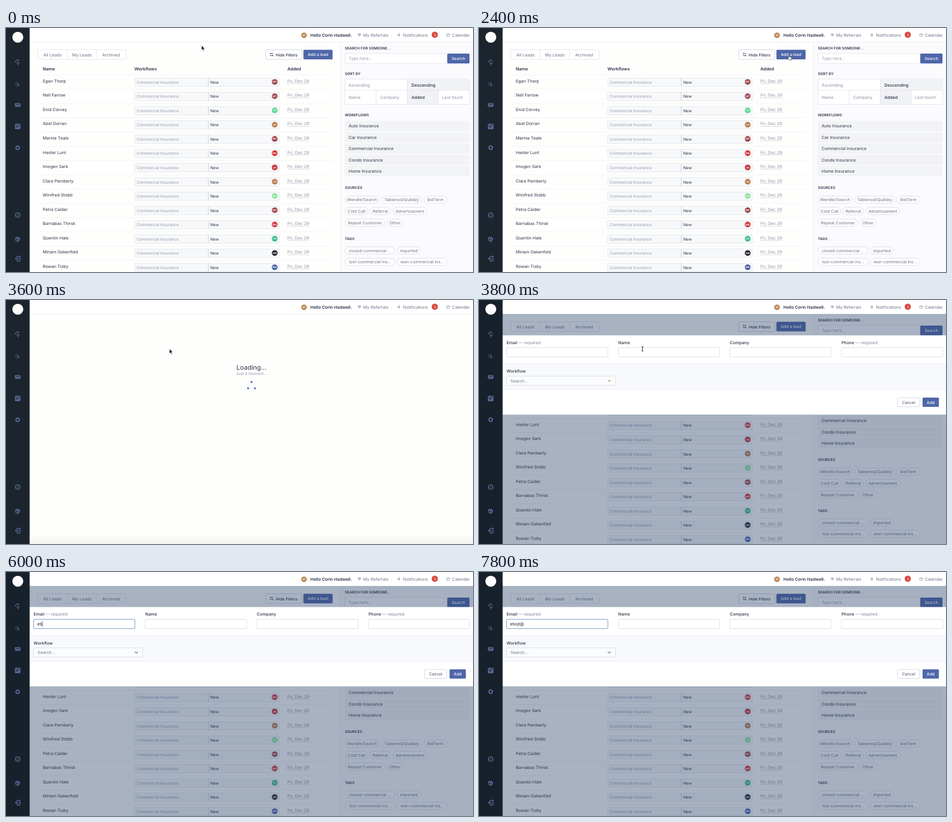
Recreate the animation shown at these times as an HTML page. Size 800 px wide and 420 px high, loop 8000 ms.

```html
<!DOCTYPE html>
<html lang="en">
<head>
<meta charset="utf-8">
<title>Leads</title>
<style>
html, body { margin: 0; height: 100%; overflow: hidden; background: #fff; }
svg { display: block; width: 800px; height: 420px; font-family: Inter, "Liberation Sans", sans-serif; text-rendering: geometricPrecision; }
</style>
</head>
<body>
<svg id="stage" viewBox="0 0 800 420"></svg>
<script>
const NS = 'http://www.w3.org/2000/svg';
const stage = document.getElementById('stage');
const INK = '#2d3348', GREY = '#8b92a5', BLUE = '#4e67a9', LINE = '#dde1e9', ICON = '#7f90d8';

function add(parent, tag, attrs) {
  const node = document.createElementNS(NS, tag);
  for (const key in attrs) node.setAttribute(key, attrs[key]);
  return parent.appendChild(node);
}
const group = (parent = stage) => add(parent, 'g', {});
const rect = (g, x, y, width, height, fill, stroke = 'none', rx = 0) =>
  add(g, 'rect', { x, y, width, height, fill, stroke, rx, 'stroke-width': 0.8 });
const circle = (g, cx, cy, r, fill) => add(g, 'circle', { cx, cy, r, fill });
const path = (g, d, stroke, fill = 'none', width = 0.8) =>
  add(g, 'path', { d, stroke, fill, 'stroke-width': width });
// y is the middle of the line of text
function text(g, x, y, str, fill = INK, size = 7.25, weight = 400, anchor = 'start') {
  const node = add(g, 'text', {
    x, y: y + size * 0.36, fill, 'font-size': size, 'font-weight': weight, 'text-anchor': anchor
  });
  node.textContent = str;
  return node;
}

rect(stage, 0, 0, 800, 420, '#fefefd');

// Lead list
const list = group();
rect(list, 573, 24, 227, 396, '#fbfbfd');
path(list, 'M573 24V420', '#eceef2');
rect(list, 54.5, 37.5, 151, 16.5, '#fff', LINE, 1.5);
path(list, 'M105 37.5v16.5M155 37.5v16.5', LINE);
text(list, 79.7, 46, 'All Leads', '#697187', 7.3, 400, 'middle');
text(list, 130, 46, 'My Leads', '#697187', 7.3, 400, 'middle');
text(list, 180, 46, 'Archived', '#697187', 7.3, 400, 'middle');
rect(list, 445, 37.5, 62, 16.5, '#fff', '#c9cfdb', 1.5);
path(list, 'M452 44h6M452 47.5h6M453.5 42.8v2.4M456.5 46.3v2.4', INK);
text(list, 462, 46, 'Hide Filters', INK, 6.95, 500);
rect(list, 509.5, 37.5, 50, 16.5, BLUE, 'none', 1.5);
text(list, 534.5, 46, 'Add a lead', '#fff', 6.9, 500, 'middle');
[[63, 'Name'], [220, 'Workflows'], [482, 'Added']].forEach(([x, s]) => text(list, x, 70.5, s, INK, 7.4, 600));

const people = ['Egan Thorp', 'Nell Farrow', 'Enid Corvey', 'Abel Dorran', 'Marnie Teale', 'Hester Lunt', 'Imogen Sark',
  'Clara Pemberly', 'Winifred Stobb', 'Petra Calder', 'Barnabas Thirsk', 'Quentin Hale', 'Miriam Oakenfold', 'Rowan Tisby'];
const badges = {
  m: ['MT', '#a14a50'], g: ['GS', '#5fd890'], l: ['LG', '#c07f50'], r: ['MA', '#d8393d'], z: ['ZR', '#c93436'],
  p: ['PS', '#8fe3a0'], t: ['GS', '#3fc08c'], d: ['AM', '#2a2430'], b: ['MA', '#4b63a6']
};
people.forEach((name, i) => {
  const y = 81 + i * 24.54;
  const [initials, colour] = badges['mmglmrzlpmrtdb'[i]];
  path(list, `M54 ${y}H560`, '#eff0f3', 'none', 0.7);
  text(list, 63, y + 10.2, name);
  rect(list, 220.5, y + 5, 247.5, 14.5, '#f6f8fa', '#e0e4ea', 1);
  path(list, `M346.5 ${y + 5}v14.5`, '#c4cad4');
  text(list, 224, y + 12.3, 'Commercial Insurance', '#959bab', 6.8);
  text(list, 350, y + 12.3, 'New', INK, 6.8);
  circle(list, 460.3, y + 11.8, 4.9, colour);
  text(list, 460.3, y + 11.8, initials, '#fff', 4.2, 600, 'middle');
  text(list, 482, y + 10.2, 'Fri, Dec 29', GREY, 7.25);
  path(list, `M482 ${y + 14.8}h37.5`, '#a4a9b6', 'none', 0.7).setAttribute('stroke-dasharray', '1 .6');
});

// Filter column
const title = (y, s) => text(list, 580.5, y, s, INK, 6.2, 600);
title(34.5, 'SEARCH FOR SOMEONE...');
rect(list, 580.8, 44, 175, 17, '#fff', LINE, 1.5);
text(list, 587, 52.5, 'Type here...', '#979daf');
rect(list, 756, 44, 38, 17, BLUE, 'none', 1.5);
text(list, 775, 52.5, 'Search', '#fff', 6.9, 500, 'middle');

title(79, 'SORT BY');
rect(list, 580.8, 88, 213.2, 43.5, '#fff', LINE, 1);
rect(list, 687.5, 88.4, 106, 18.6, '#f1f2f5');
rect(list, 687.5, 107, 53, 24, '#f1f2f5');
path(list, 'M580.8 107H794M687.5 88v43.5M634 107v24.5M740.5 107v24.5', LINE);
text(list, 587, 98, 'Ascending', GREY);
text(list, 694.5, 98, 'Descending', INK, 7.25, 500);
text(list, 587, 119, 'Name', GREY);
text(list, 641, 119, 'Company', GREY);
text(list, 694.5, 119, 'Added', INK, 7.25, 500);
text(list, 747, 119, 'Last touch', GREY);

title(150, 'WORKFLOWS');
['Auto', 'Car', 'Commercial', 'Condo', 'Home'].forEach((kind, i) => {
  rect(list, 580.5, 160 + i * 19.4, 213.5, 17.6, '#f2f3f5', 'none', 1);
  text(list, 587, 168.7 + i * 19.4, kind + ' Insurance');
});

const chip = (x, y, w, s) => {
  rect(list, x, y - 6.2, w, 12.4, '#fff', '#d5d9e1', 6.2);
  text(list, x + w / 2, y, s, '#697084', 7.15, 400, 'middle');
};
title(275, 'SOURCES');
chip(581, 295.5, 58, 'Wendle/Search');
chip(644, 295.5, 67.5, 'Tablenod/Quibbly');
chip(716, 295.5, 39.5, 'BidTerm');
chip(581, 315, 39, 'Cold Call');
chip(623.5, 315, 35.5, 'Referral');
chip(663, 315, 57.5, 'Advertisement');
chip(581, 335, 67.5, 'Repeat Customer');
chip(653, 335, 27, 'Other');
title(362.5, 'TAGS');
chip(581, 383, 85, 'closed-commercial ...');
chip(670.5, 383, 39.5, 'imported');
chip(581, 402.5, 85.5, 'lost-commercial ins...');
chip(670.5, 402.5, 85, 'won-commercial ins...');

// Loading page
const loading = group();
text(loading, 420.5, 116, 'Loading...', INK, 11, 400, 'middle');
text(loading, 420.5, 127, 'Just a moment...', GREY, 6.75, 400, 'middle');
const spinner = group(loading);
for (let i = 0; i < 3; i++) {
  const a = (i * 120 - 90) * Math.PI / 180;
  circle(spinner, 6.7 * Math.cos(a), 7.3 * Math.sin(a), 1.7, '#4a66b0');
}
for (let i = 0; i < 5; i++) rect(loading, 40, 405 + i * 3, 760, 3, `rgba(0,0,0,${0.008 * (i + 1)})`);

// Form over the dimmed list
const modal = group();
rect(modal, 40, 24, 760, 396, 'rgba(38,64,104,.4)');
const form = group(modal);
rect(form, 40, 60.3, 760, 136.5, '#fff');
rect(form, 40, 109.5, 760, 44, '#f7f9fc');
path(form, 'M40 109.5H800M40 153.5H800', '#e6eaf0');
const fields = [[47.3, 'Email', 1], [238.5, 'Name'], [429.7, 'Company'], [621, 'Phone', 1]].map(([x, s, required]) => {
  const label = text(form, x, 72.8, s, INK, 7.2, 500);
  if (required) {
    const note = add(label, 'tspan', { fill: '#7d8497', 'font-weight': 400 });
    note.textContent = ' — required';
  }
  return rect(form, x, 81.4, 173.5, 16, '#fff', '#d5d9e1', 1.5);
});
text(form, 47.3, 122.3, 'Workflow', INK, 7.2, 500);
rect(form, 47.3, 130.6, 186.5, 15.8, '#fbfcfe', '#d5d9e1', 1.5);
text(form, 54, 138.6, 'Search...', '#6d7488');
const chevron = path(form, 'M220.7 137.2l2.5 2.5 2.5-2.5', '#6d7488', 'none', 1.1);
rect(form, 717.3, 167.8, 37.5, 15.6, '#fff', '#c9cfdb', 1.5);
text(form, 736, 175.7, 'Cancel', '#4b5268', 6.9, 400, 'middle');
rect(form, 759.8, 167.4, 28, 16, BLUE, 'none', 1.5);
text(form, 773.8, 175.7, 'Add', '#fff', 6.9, 500, 'middle');
const typed = text(form, 53.3, 89.2, '', '#1d2130', 7.2);
const caret = path(form, 'M0 85v9', '#1d2130', 'none', 0.8);

// Header
rect(stage, 40, 0, 760, 24, '#fff');
const rule = path(stage, 'M40 24H800', '#e9ebef');
circle(stage, 510.5, 12.6, 4.9, '#c08b5e');
text(stage, 510.5, 12.6, 'JP', '#fff', 4.2, 600, 'middle');
text(stage, 521.5, 12, 'Hello Corin Hadwell.', INK, 7.25, 600);
path(stage, 'M603.3 9.8h4v2.5l-2 2-2-2z', '#a0a6b5', '#c3c8d2');
text(stage, 612, 12, 'My Referrals', '#6b7287', 7.2);
path(stage, 'M671.5 13.8v-3l1.5-1 1.5 1v3z', '#a0a6b5', '#c3c8d2');
text(stage, 680, 12, 'Notifications', '#6b7287', 7.2);
circle(stage, 734.5, 11.6, 5.3, '#d8453f');
text(stage, 734.5, 11.6, '3', '#fff', 6, 400, 'middle');
path(stage, 'M755 10h5v4.5h-5zM755 11.3h5', '#a0a6b5');
text(stage, 764, 12, 'Calendar', '#6b7287', 7.2);

// Side bar
const side = rect(stage, 0, 0, 40.5, 420, '#1c252d');
circle(stage, 20.2, 15.8, 9.4, '#fff');
const icon = (y, d, fill) => path(stage, d, ICON, fill, 0.9).setAttribute('transform', `translate(20 ${y})`);
icon(59, 'M-4 0a4 4 0 0 1 7-2.5M-1-1l3 4M3 0l1 1');
path(stage, 'M19 60l2 4', '#c4606c', 'none', 1);
icon(96.5, 'M-3.5-2.5h1M-3.5 0h1M-3.5 2.5h1M-1-2.5h1.5M-1 0h3M-1 2.5h4');
icon(132.5, 'M-4-2.5h8v5h-8zM-4-2l4 3 4-3M-3 2.5l2-2M3 2.5l-2-2');
icon(169.5, 'M-4-4h8v8h-8zM-4-1h8M-4 2h8M-1-4v3M2-1v5M-2 2v2');
const gear = 'M-2.8 0a2.8 2.8 0 1 0 5.6 0a2.8 2.8 0 1 0-5.6 0M0-4.4v1.6M0 2.8v1.6M-4.4 0h1.6M2.8 0h1.6M-3.1-3.1l1.1 1.1M2 2l1.1 1.1M-3.1 3.1l1.1-1.1M2-2l1.1-1.1';
icon(206, gear);
icon(322, 'M-4 0a4 4 0 1 0 8 0a4 4 0 1 0-8 0M-1.5 1.5l3-3');
icon(363, 'M-3-3l2.5 1 2-1 2 2.5-1 3.5-3 1.5-3-2zM-3-3l3 3 3-.5M0 0v4');
icon(397, 'M-1-2v-2h5v8h-5v-2M2 0h-6M-2.2-1.8l-1.8 1.8 1.8 1.8');

// Pointers
const arrow = path(stage, 'M0 0v8.2l1.9-1.7 1.4 3 1.3-.6-1.4-2.9h2.5z', '#fff', '#15171f', 0.6);
const hand = path(stage, 'M-.8 5V.8a.8.8 0 0 1 1.6 0V3.6l3 .7q1 .3.8 1.5L4 9H-.2L-2.8 5.8q.4-1.2 2 .2z', '#20242f', '#fff', 0.7);
const beam = path(stage, 'M-1.5-4.2q1.3 0 1.5.8.2-.8 1.5-.8M0-3.4v6.8M-1.5 4.2q1.3 0 1.5-.8.2.8 1.5.8', '#1b1620', 'none', 1);

const moves = [[0, 1200, 335, 30, 531, 46], [2600, 3400, 531, 46, 280, 84], [3800, 4800, 280, 84, 141, 91]];
function pointerAt(t) {
  const [from, to, x0, y0, x1, y1] = moves.filter(m => t >= m[0]).pop();
  const u = Math.min(1, (t - from) / (to - from));
  const k = u * u * (3 - 2 * u);
  return [x0 + (x1 - x0) * k, y0 + (y1 - y0) * k];
}
const show = (node, on) => node.setAttribute('display', on ? 'inline' : 'none');
const keyTimes = [5600, 5800, 6000, 6200, 6400, 6800, 7400];

function draw(now) {
  const t = Math.floor(now % 8000 / 200) * 200;
  const isLoading = t >= 3200 && t < 3800, isForm = t >= 3800, focused = t >= 5200;
  show(list, !isLoading);
  show(loading, isLoading);
  show(modal, isForm);
  show(rule, !isForm);
  side.setAttribute('fill', isForm ? '#17212b' : '#1c252d');
  spinner.setAttribute('transform', `translate(420.5 148.3) rotate(${(t - 3600) * 0.36})`);

  form.setAttribute('transform', `translate(0 ${t < 4000 ? 0.5 : 0})`);
  chevron.setAttribute('stroke', t < 4400 ? '#b09a58' : '#6d7488');
  fields[0].setAttribute('stroke', focused ? '#5f7fc0' : t >= 4800 ? '#a9afbb' : '#d5d9e1');
  const count = keyTimes.filter(k => t >= k).length;
  typed.textContent = 'etiojt@'.slice(0, count);
  const end = isForm && count ? typed.getComputedTextLength() : 0;
  caret.setAttribute('transform', `translate(${53.8 + end} 0)`);
  show(caret, focused && t < 7600);

  const [x, y] = pointerAt(t);
  const onButton = t < 3200 && x > 509 && y > 37 && y < 54;
  show(arrow, !isForm && !onButton);
  show(hand, onButton);
  show(beam, isForm && t < 5600);
  for (const p of [arrow, hand, beam]) p.setAttribute('transform', `translate(${x} ${y})`);
}

const start = performance.now();
function tick() {
  draw(performance.now() - start);
  requestAnimationFrame(tick);
}
tick();
</script>
</body>
</html>
```
